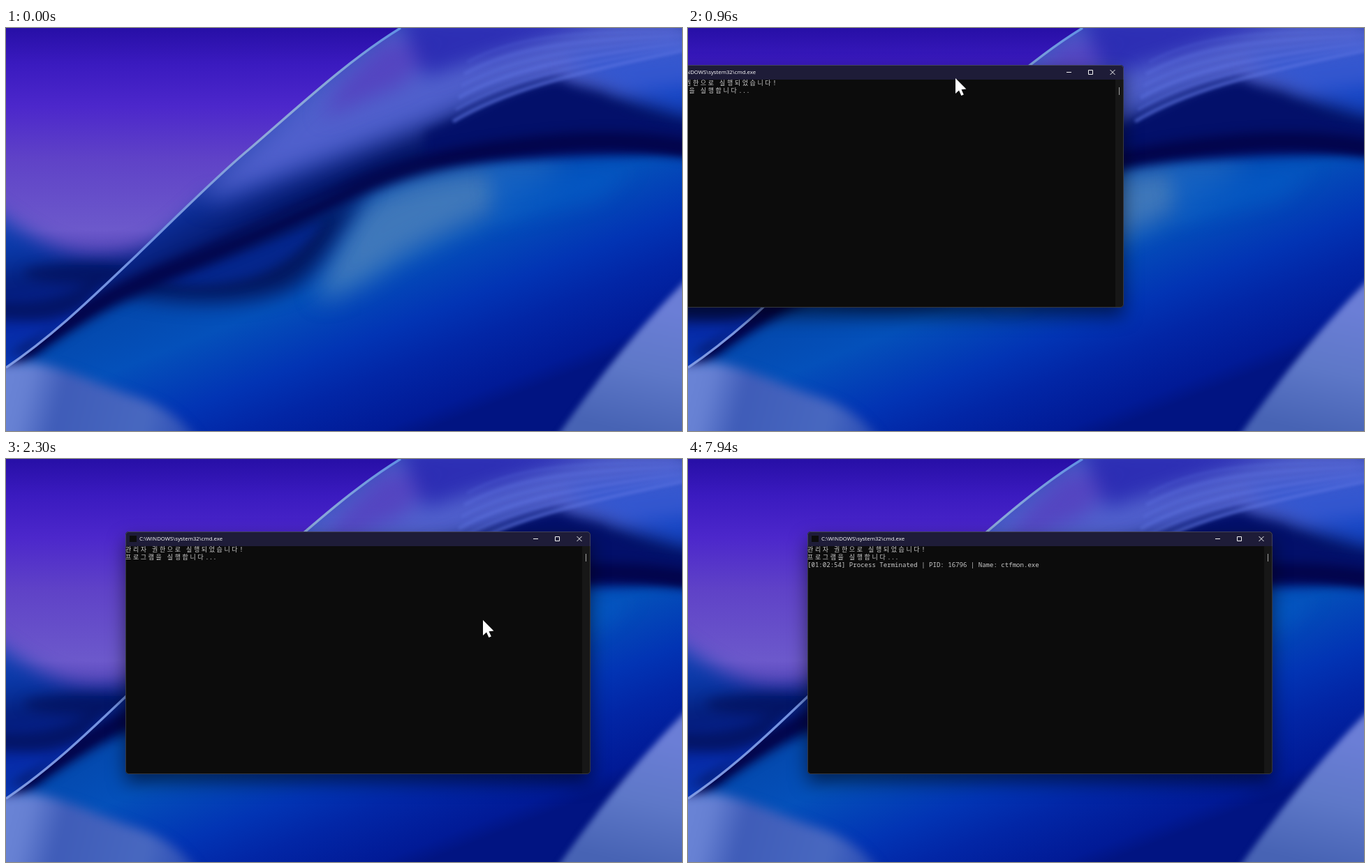
Recreate the animation shown at these times as an HTML page. Size 968 by 578 pixels, loop 8000 ms.

```html
<!DOCTYPE html>
<html lang="ko">
<head>
<meta charset="utf-8">
<title>Console window</title>
<style>
html, body { margin: 0; width: 100%; height: 100%; overflow: hidden; background: #0228a8; }
#stage { position: relative; width: 968px; height: 578px; overflow: hidden; }
#stage > svg, #win, #win * { position: absolute; }
#win {
  width: 666px; height: 348px; left: 0; top: 0; box-sizing: border-box;
  background: #0c0c0c; border-radius: 5px; box-shadow: 0 12px 26px rgba(0, 0, 8, .55);
}
#frame { inset: 0; border: 1px solid rgba(125, 130, 150, .38); border-radius: 5px; }
#bar { left: 0; top: 0; width: 666px; height: 21px; background: #1e1c38; border-radius: 5px 5px 0 0; }
#icon { left: 6px; top: 6px; width: 10px; height: 9px; background: #0c0c0c; }
#title { left: 20px; top: 4px; font: 7.8px/12px "Open Sans", "Noto Sans", sans-serif; color: #fff; white-space: pre; }
#buttons { left: 580px; top: 4px; }
#track { left: 654px; top: 21px; width: 11px; height: 326px; background: #171717; border-radius: 0 0 4px 0; }
#thumb { left: 659px; top: 32px; width: 1px; height: 11px; background: #a2a2a2; }
#arrows { left: 654px; top: 21px; }
.row { left: 0; height: 11px; font: 9.07px/11px "Noto Sans Mono", "DejaVu Sans Mono", monospace; color: #ccc; white-space: pre; }
#win .row b {
  position: static; font: 9px/11px "Noto Sans CJK KR", "Noto Sans CJK JP", "Noto Sans CJK", sans-serif;
  letter-spacing: calc(10.88px - .92em);
}
#caret { left: 0; width: 6px; height: 3px; background: #f2f2f2; }
</style>
</head>
<body>
<div id="stage">
  <svg width="968" height="578" viewBox="0 0 968 578">
    <defs>
      <linearGradient id="sky" x1="0" y1="0" x2="0" y2="1">
        <stop offset="0" stop-color="#270fa6"/><stop offset=".15" stop-color="#3a1abf"/>
        <stop offset=".33" stop-color="#4c27cb"/><stop offset=".55" stop-color="#5f42c7"/>
        <stop offset=".85" stop-color="#6c59cb"/><stop offset="1" stop-color="#5542b6"/>
      </linearGradient>
      <linearGradient id="hill" gradientUnits="userSpaceOnUse" x1="0" y1="260" x2="30" y2="480">
        <stop offset="0" stop-color="#1646b8"/><stop offset=".3" stop-color="#0836a4"/>
        <stop offset=".5" stop-color="#041b76"/><stop offset=".72" stop-color="#0627a4"/>
        <stop offset="1" stop-color="#0838b4"/>
      </linearGradient>
      <linearGradient id="deep" gradientUnits="userSpaceOnUse" x1="450" y1="200" x2="600" y2="578">
        <stop offset=".2" stop-color="#0448ac"/><stop offset=".4" stop-color="#0450ba"/>
        <stop offset=".62" stop-color="#0234b4"/><stop offset=".76" stop-color="#0226a6"/>
        <stop offset=".94" stop-color="#011a96"/><stop offset="1" stop-color="#011482"/>
      </linearGradient>
      <linearGradient id="ribbon" gradientUnits="userSpaceOnUse" x1="300" y1="190" x2="355" y2="290">
        <stop offset="0" stop-color="#2c49b4"/><stop offset=".45" stop-color="#0b2b92"/>
        <stop offset="1" stop-color="#041668"/>
      </linearGradient>
      <linearGradient id="edge" gradientUnits="userSpaceOnUse" x1="0" y1="0" x2="570" y2="0">
        <stop offset="0" stop-color="#809ae2"/><stop offset=".35" stop-color="#6f8fe0"/>
        <stop offset=".65" stop-color="#8fa9d8"/><stop offset=".82" stop-color="#86a6d8"/>
        <stop offset="1" stop-color="#5f8fe4"/>
      </linearGradient>
      <linearGradient id="pearl" gradientUnits="userSpaceOnUse" x1="930" y1="400" x2="890" y2="578">
        <stop offset="0" stop-color="#6b7ed6"/><stop offset=".5" stop-color="#5e78c8"/>
        <stop offset="1" stop-color="#4763b4"/>
      </linearGradient>
      <linearGradient id="mist" gradientUnits="userSpaceOnUse" x1="0" y1="500" x2="270" y2="570">
        <stop offset="0" stop-color="#6a84d6"/><stop offset=".12" stop-color="#6680d2"/>
        <stop offset=".3" stop-color="#3f5cb8"/><stop offset=".75" stop-color="#4868c0"/>
        <stop offset="1" stop-color="#2a4cb4"/>
      </linearGradient>
      <clipPath id="right"><path d="M0 487C70 440 130 380 188 325C240 275 300 214 348 174C420 112 490 46 565 0H968V578H0Z"/></clipPath>
      <g id="filters"></g>
    </defs>
    <rect width="968" height="340" fill="url(#sky)"/>
    <path filter="url(#b14)" fill="url(#hill)" d="M-60 235C10 275 50 325 130 326S230 300 300 235V640H-60Z"/>
    <g filter="url(#b8)" fill="#03125c">
      <ellipse cx="110" cy="352" rx="85" ry="15" opacity=".7"/>
      <path d="M-20 392C50 395 90 385 150 350L110 400C70 425 40 420 -20 418Z" opacity=".8"/>
      <path d="M0 470L80 425L30 465Z"/>
    </g>
    <g clip-path="url(#right)">
      <rect width="968" height="578" fill="url(#deep)"/>
      <path filter="url(#b18)" fill="#4a80bc" opacity=".85" d="M512 250C580 205 680 195 800 204C740 250 610 300 555 335C520 360 480 385 445 390C455 350 480 295 512 250Z"/>
      <path filter="url(#b14)" fill="#0458c4" opacity=".7" d="M690 200H900L850 245L700 280Z"/>
      <path filter="url(#b14)" fill="#031860" d="M140 372C260 340 400 300 525 228C480 270 460 345 405 374C340 402 230 398 140 372Z"/>
      <path filter="url(#b8)" fill="#04268c" d="M215 358C300 330 380 300 455 274C430 320 385 350 335 362C285 372 240 372 215 358Z"/>
      <path filter="url(#b4)" fill="url(#ribbon)" d="M-20 510L188 315L348 164L565 -20H990V184C850 160 700 165 560 205C440 245 300 320 170 375L20 480Z"/>
      <path filter="url(#b18)" fill="#5060cc" d="M600 -30L440 80L290 225L285 250C380 220 500 175 600 140C680 110 740 60 990 100V-30Z"/>
      <g filter="url(#b14)">
        <path fill="#563fbe" opacity=".8" d="M540 20L620 20L570 80L450 130L480 80Z"/>
        <path fill="#2a2ab2" opacity=".9" d="M560 -20H880L700 38L600 70Z"/>
        <path fill="#3457cf" d="M800 45L990 20V110L880 95Z"/>
        <path fill="#1445c4" d="M880 95L990 80V130Z"/>
      </g>
      <path filter="url(#b8)" fill="#03106a" d="M600 150C680 120 730 80 792 74C830 96 850 92 868 108C890 108 900 130 990 142V178L600 190Z"/>
      <g id="streaks" filter="url(#b2)" fill="none" stroke="#6076e4"></g>
      <path filter="url(#b8)" fill="none" stroke="#02044a" stroke-width="25" d="M-20 500C80 420 150 385 220 354C310 318 420 272 490 236C580 190 700 170 820 163C900 160 950 167 1000 176"/>
      <path filter="url(#b8)" fill="url(#mist)" d="M-30 480H40C90 488 140 515 190 530C230 545 255 562 280 600H-30Z"/>
      <path filter="url(#b4)" fill="url(#pearl)" d="M786 590C850 500 900 435 990 345V600Z"/>
    </g>
    <path fill="none" stroke="url(#edge)" stroke-width="3.4" d="M0 487C70 440 130 380 188 325C240 275 300 214 348 174C420 112 490 46 565 0"/>
  </svg>
  <div id="win">
    <div id="bar"></div>
    <div id="icon"></div>
    <div id="title">C:\WINDOWS\system32\cmd.exe</div>
    <svg id="buttons" width="80" height="13" fill="none" stroke="#f4f4f4" stroke-width="1">
      <path d="M4 6.5H11M35.5 3.5H41.5V9.5H35.5ZM66.5 3L73.5 10M73.5 3L66.5 10"/>
    </svg>
    <div id="track"></div>
    <div id="thumb"></div>
    <svg id="arrows" width="11" height="326" fill="#9a9a9a"><path d="M4 8L6 5L8 8ZM4 319H8L6 322Z"/></svg>
    <div id="rows"></div>
    <div id="caret"></div>
    <div id="frame"></div>
  </div>
  <svg id="pointer" width="18" height="27" style="left:0;top:0">
    <path fill="#fff" d="M0 0V22L5 17.6L8.4 25L11.8 23.5L8.5 16.2L15.4 15.4Z"/>
  </svg>
</div>
<script>
const LOOP = 8000, TICK = 200 / 3, TICK_START = 490;
const ROW_TOP = 20, ROW_HEIGHT = 11;
const $ = id => document.getElementById(id);

$('filters').innerHTML = [2, 4, 8, 14, 18].map(r =>
  `<filter id="b${r}" filterUnits="userSpaceOnUse" x="-80" y="-80" width="1130" height="740" color-interpolation-filters="sRGB"><feGaussianBlur stdDeviation="${r}"/></filter>`).join('');

$('streaks').innerHTML = Array.from({length: 6}, (_, i) => {
  const y = 134 - i * 17;
  return `<path stroke-width="${i % 2 ? 3 : 5}" opacity="${0.62 - i * 0.07}" d="M${640 + i * 4} ${y}C${710 + i * 6} ${y - 42} ${800 + i * 5} ${y - 68 + i * 5} 980 ${y - 104 + i * 12}"/>`;
}).join('');

const lines = [
  '관리자 권한으로 실행되었습니다!',
  '프로그램을 실행합니다...',
  '[01:02:54] Process Terminated | PID: 16796 | Name: ctfmon.exe',
];
const rows = lines.map((text, i) => {
  const row = document.createElement('div');
  row.className = 'row';
  row.style.top = ROW_TOP + i * ROW_HEIGHT + 'px';
  row.innerHTML = text.replace(/[가-힣]+/g, '<b>$&</b>');
  return $('rows').appendChild(row);
});

// [time, x, y]
const winPath = [[490, -530, -120], [690, -322, -24], [960, -39, 54], [1290, 169, 98], [1556, 171, 104]];
const pointerPath = [[490, -70, -60], [690, 121, 15], [960, 385, 73], [1290, 565, 117], [1556, 567, 121],
  [2060, 567, 121], [2623, 886, 423], [3156, 886, 423], [3410, 975, 426]];
const caretOn = [[500, 1030], [1560, 2090], [2620, 3150], [3680, 4220], [5280, 5810], [6350, 6880], [7410, 7940]];

const slope = (a, b, k) => (b[k] - a[k]) / (b[0] - a[0]);

// Monotone tangent: zero at ends and holds, harmonic mean elsewhere.
function tangent(path, i, k) {
  if (i === 0) return slope(path[0], path[1], k);
  if (i === path.length - 1) return 0;
  const before = slope(path[i - 1], path[i], k), after = slope(path[i], path[i + 1], k);
  return before * after > 0 ? 2 * before * after / (before + after) : 0;
}

function along(path, t, k) {
  if (t <= path[0][0]) return path[0][k];
  const i = path.findIndex(p => p[0] > t) - 1;
  if (i < 0) return path[path.length - 1][k];
  const a = path[i], b = path[i + 1], span = b[0] - a[0], u = (t - a[0]) / span, v = 1 - u;
  return v * v * (1 + 2 * u) * a[k] + u * u * (3 - 2 * u) * b[k]
    + span * u * v * (v * tangent(path, i, k) - u * tangent(path, i + 1, k));
}

function place(el, path, t) {
  el.style.transform = `translate(${Math.round(along(path, t, 1))}px, ${Math.round(along(path, t, 2))}px)`;
}

const show = (el, on) => { el.style.visibility = on ? 'visible' : 'hidden'; };

function draw(t) {
  const snapped = TICK_START + Math.floor((t - TICK_START + 3) / TICK) * TICK;
  const started = t >= 500;
  $('win').style.display = started ? 'block' : 'none';
  show($('pointer'), started && t < 3410);
  place($('win'), winPath, snapped);
  place($('pointer'), pointerPath, snapped);

  const printed = t >= 4620;
  show(rows[2], printed);
  $('caret').style.top = (printed ? 61 : 50) + 'px';
  $('caret').style.display = caretOn.some(([from, to]) => t >= from && t < to) ? 'block' : 'none';
  $('arrows').style.display = t >= 2490 && t < 2920 ? 'block' : 'none';
}

const start = performance.now();
function loop() {
  draw((performance.now() - start) % LOOP);
  requestAnimationFrame(loop);
}
loop();
</script>
</body>
</html>
```
